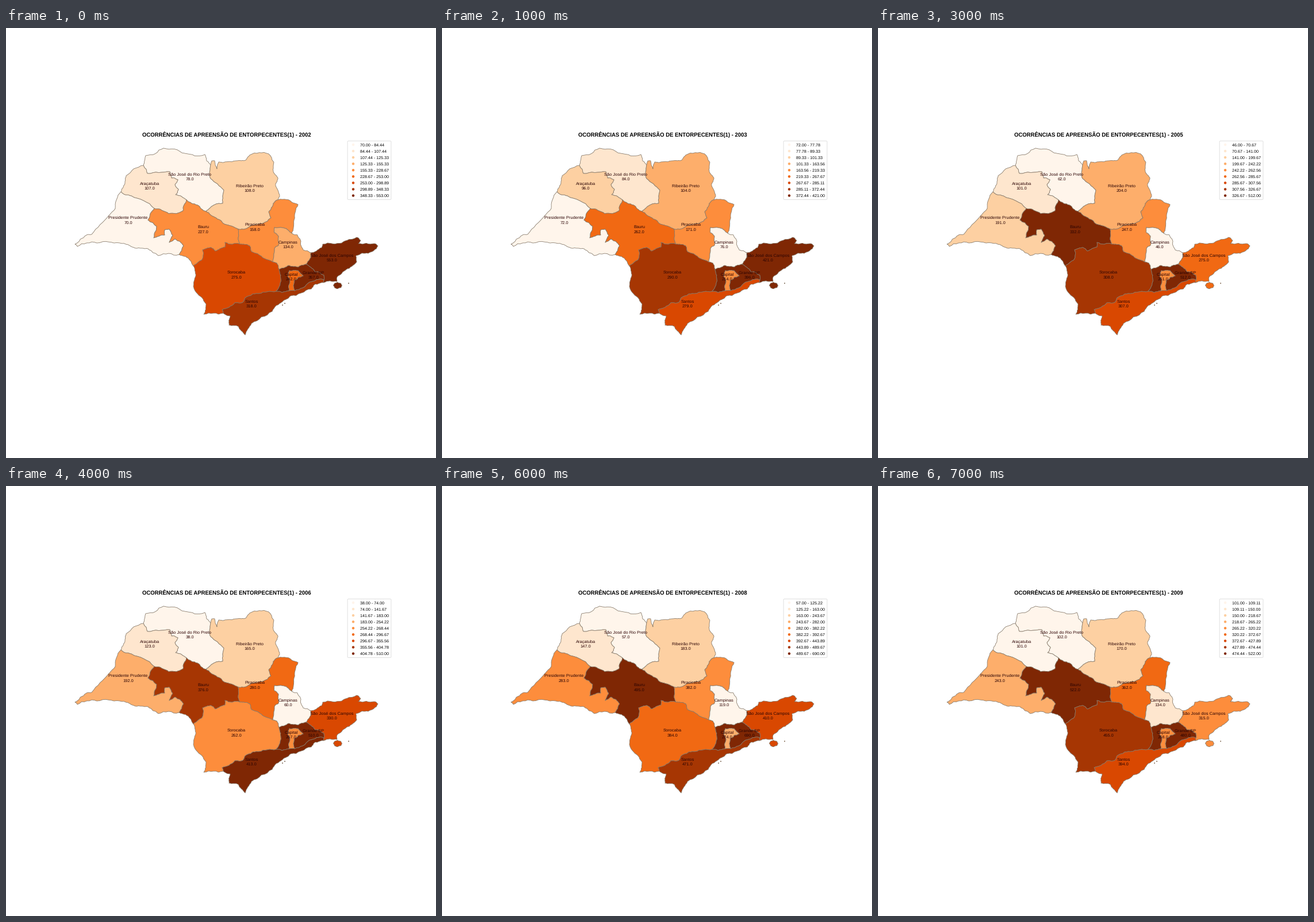
Recreate the animation shown at these times as a matplotlib script. Size 748 by 748 pixels, loop 8 s.

```python
import numpy as np
import matplotlib.pyplot as plt
from matplotlib.animation import FuncAnimation
from matplotlib.patches import Circle, FancyBboxPatch, Polygon

SIZE, DPI = 748, 72
FIRST_YEAR = 2002
TITLE = "OCORRÊNCIAS DE APREENSÃO DE ENTORPECENTES(1) - {}"
ORANGES = ["#fff5eb", "#fee6ce", "#fdd0a2", "#fdae6b", "#fd8d3c",
           "#f16913", "#d94801", "#a63603", "#7f2704"]
EDGE = "#85796a"
LABEL = "#2a0303"

plt.rcParams["font.family"] = "Liberation Sans"
plt.rcParams["text.hinting"] = "none"

# key: (label, x, y, yearly values)
REGIONS = {
    "rio": ("São José do Rio Preto", 320, 254, [78, 84, 77, 62, 38, 48, 57, 102]),
    "ara": ("Araçatuba", 250, 270, [107, 96, 65, 101, 123, 152, 147, 101]),
    "rib": ("Ribeirão Preto", 424, 274, [108, 104, 106, 204, 165, 139, 183, 170]),
    "pru": ("Presidente Prudente", 212.5, 329.5, [70, 72, 77, 191, 192, 228, 283, 243]),
    "bau": ("Bauru", 343, 345.5, [227, 262, 301, 332, 376, 447, 495, 522]),
    "pir": ("Piracicaba", 433, 341.5, [158, 171, 198, 247, 280, 322, 382, 362]),
    "cam": ("Campinas", 490.5, 372, [134, 76, 41, 46, 60, 85, 119, 134]),
    "sor": ("Sorocaba", 401, 424.5, [275, 290, 276, 308, 262, 301, 384, 455]),
    "san": ("Santos", 427, 475, [318, 279, 302, 307, 413, 428, 471, 394]),
    "sjc": ("São José dos Campos", 567, 394.5, [553, 421, 316, 275, 330, 371, 410, 315]),
    "gsp": ("Grande SP", 535, 425, [357, 396, 434, 512, 510, 586, 690, 480]),
    "cap": ("Capital", 496.5, 428, [242, 214, 200, 261, 267, 270, 274, 268]),
}

# Points where three areas meet, clockwise along the outside, then inside.
NODES = {
    "A": (200, 285), "B": (239, 239), "C": (356, 238), "D": (473, 299),
    "E": (497, 357), "F": (530, 391), "G": (552, 443), "H": (378, 496),
    "I": (326, 414), "J": (301, 394),
    "K": (258, 314), "L": (314, 299), "M": (348, 319), "N": (404, 350),
    "O": (407, 376), "P": (464, 407), "Q": (475, 420), "R": (522, 411),
    "S": (553, 438), "T": (470, 458), "U": (492, 457), "V": (502, 457),
}

# (region, neighbour or "" for outside, end nodes, key bends between them)
BORDERS = [
    ("ara", "", "AB", [(207, 268), (209, 257)]),
    ("rio", "", "BC", [(243, 222), (274, 209), (311, 218), (346, 220), (349, 231)]),
    ("rib", "", "CD", [(358, 231), (363, 231), (367, 245), (370, 233), (400, 231),
                       (418, 229), (424, 221), (457, 219), (466, 234), (465, 250),
                       (473, 261), (469, 271), (476, 293)]),
    ("pir", "", "DE", [(481, 298), (508, 307), (503, 321), (500, 347)]),
    ("cam", "", "EF", [(507, 360), (513, 371), (517, 386)]),
    ("sjc", "", "FG", [(549, 382), (551, 376), (584, 374), (610, 364), (617, 370),
                       (613, 375), (641, 375), (647, 379), (630, 392), (609, 396),
                       (610, 407), (592, 420), (576, 433), (576, 441)]),
    ("san", "", "GH", [(537, 446), (531, 454), (495, 466), (481, 476), (463, 493),
                       (427, 514), (416, 534), (404, 519), (388, 517), (390, 501)]),
    ("sor", "", "HI", [(344, 498), (348, 480), (331, 460), (326, 449), (329, 434)]),
    ("bau", "", "IJ", [(321, 405)]),
    ("pru", "", "JA", [(265, 396), (247, 384), (225, 383), (198, 374), (158, 374),
                       (124, 380), (120, 376), (130, 367), (149, 359), (179, 326),
                       (190, 314)]),
    ("ara", "pru", "AK", [(218, 292)]),
    ("ara", "rio", "BL", [(246, 253), (285, 250), (288, 261), (299, 264),
                          (294, 272), (300, 281), (295, 290)]),
    ("ara", "bau", "KL", [(283, 323), (308, 318)]),
    ("rio", "bau", "LM", [(333, 308)]),
    ("rio", "rib", "CM", [(356, 262), (379, 282), (377, 305), (364, 307)]),
    ("rib", "bau", "MN", [(365, 330), (390, 344)]),
    ("rib", "pir", "ND", [(418, 349), (455, 336), (461, 330), (457, 320), (465, 305)]),
    ("bau", "pru", "KJ", [(247, 334), (262, 345), (257, 365), (276, 360), (276, 351),
                          (284, 350), (290, 361), (284, 373), (294, 367), (309, 379)]),
    ("bau", "pir", "NO", [(404, 364)]),
    ("bau", "sor", "IO", [(341, 403), (342, 386), (357, 382), (364, 388),
                          (381, 381), (381, 373)]),
    ("pir", "sor", "OP", [(424, 379), (427, 389), (446, 399)]),
    ("pir", "cam", "EP", [(484, 348), (467, 347), (467, 356), (474, 362),
                          (474, 378), (467, 384)]),
    ("cam", "sor", "PQ", [(471, 409)]),
    ("cam", "gsp", "QR", [(492, 413), (508, 416)]),
    ("cam", "sjc", "FR", [(531, 398)]),
    ("gsp", "sjc", "RS", [(537, 424), (553, 430)]),
    ("san", "sjc", "SG", []),
    ("sor", "gsp", "QT", [(478, 430), (477, 444)]),
    ("sor", "san", "HT", [(376, 490), (398, 478), (412, 477), (420, 467), (440, 462)]),
    ("san", "gsp", "TU", [(480, 460)]),
    ("san", "cap", "UV", []),
    ("san", "gsp", "VS", [(528, 442)]),
    ("cap", "gsp", "UV", [(494, 440), (490, 430), (493, 422), (508, 422),
                          (517, 431), (501, 440)]),
]


def roughen(points, seed, rounds=3):
    """Split each segment and push the new points sideways."""
    rng = np.random.default_rng(seed)
    pts = np.array(points, float)
    for _ in range(rounds):
        step = np.diff(pts, axis=0)
        normal = np.column_stack([-step[:, 1], step[:, 0]])
        shift = rng.uniform(-0.11, 0.11, (len(step), 1))
        out = np.empty((2 * len(pts) - 1, 2))
        out[::2] = pts
        out[1::2] = pts[:-1] + step / 2 + normal * shift
        pts = out
    return pts


def outline(key):
    """Chain the borders of one region into a ring."""
    rest = [line for a, b, line in lines if key in (a, b)]
    ring = rest.pop(0)
    while rest:
        for i, line in enumerate(rest):
            if np.allclose(line[-1], ring[-1]):
                line = line[::-1]
            if np.allclose(line[0], ring[-1]):
                ring = np.vstack([ring, line[1:]])
                rest.pop(i)
                break
    return ring


def blob(x, y, rx, ry, seed):
    t = np.linspace(0, 2 * np.pi, 9)
    return roughen(np.column_stack([x + rx * np.cos(t), y + ry * np.sin(t)]), seed, 2)


fig = plt.figure(figsize=(SIZE / DPI, SIZE / DPI), dpi=DPI, facecolor="white")
ax = fig.add_axes([0, 0, 1, 1])
ax.set_xlim(0, SIZE)
ax.set_ylim(SIZE, 0)
ax.axis("off")

lines = [(a, b, roughen([NODES[ends[0]], *bends, NODES[ends[1]]], i))
         for i, (a, b, ends, bends) in enumerate(BORDERS)]
rings = [(key, outline(key)) for key in REGIONS]
rings += [("sjc", blob(577, 448, 7.5, 5.5, 1)), ("sjc", blob(596, 444, 0.6, 0.6, 2)),
          ("san", blob(485, 479, 0.6, 0.6, 3)), ("san", blob(481, 482, 0.6, 0.6, 4))]

shapes = []
for key, ring in rings:
    patch = Polygon(ring, edgecolor=EDGE, linewidth=0.8, joinstyle="round")
    shapes.append((key, ax.add_patch(patch)))

counts = {}
for key, (name, x, y, _) in REGIONS.items():
    style = dict(ha="center", va="baseline", size=7.45, color=LABEL, zorder=5)
    ax.text(x, y + 2.6, name, **style)
    counts[key] = ax.text(x, y + 11.1, "", **style)

title = ax.text(383.5, 190.2, "", ha="center", va="baseline", size=9.5,
                weight="bold", color="black")

ax.add_patch(FancyBboxPatch((595.5, 198), 73, 99, facecolor="white",
                            boxstyle="round,pad=1.4,rounding_size=1.4",
                            edgecolor="#d9d9d9", linewidth=0.8))
ranges = []
for i, color in enumerate(ORANGES):
    y = 203 + 11.07 * i
    ax.add_patch(Circle((604, y), 2.2, facecolor=color, linewidth=0))
    ranges.append(ax.text(616.3, y + 2.6, "", va="baseline", size=7.15,
                          color="black"))


def draw(frame):
    values = {key: row[3][frame] for key, row in REGIONS.items()}
    # The legend holds nine classes of equal count.
    bounds = np.quantile(list(values.values()), np.linspace(0, 1, 10)).round(6)
    colors = {key: ORANGES[np.searchsorted(bounds[1:-1], value)]
              for key, value in values.items()}
    title.set_text(TITLE.format(FIRST_YEAR + frame))
    for text, low, high in zip(ranges, bounds, bounds[1:]):
        text.set_text(f"{low:.2f} - {high:.2f}")
    for key, shape in shapes:
        shape.set_facecolor(colors[key])
    for key, value in values.items():
        counts[key].set_text(f"{value:.1f}")
    return []


anim = FuncAnimation(fig, draw, frames=8, interval=1000, repeat=True,
                     repeat_delay=0, blit=False)
plt.show()
```
